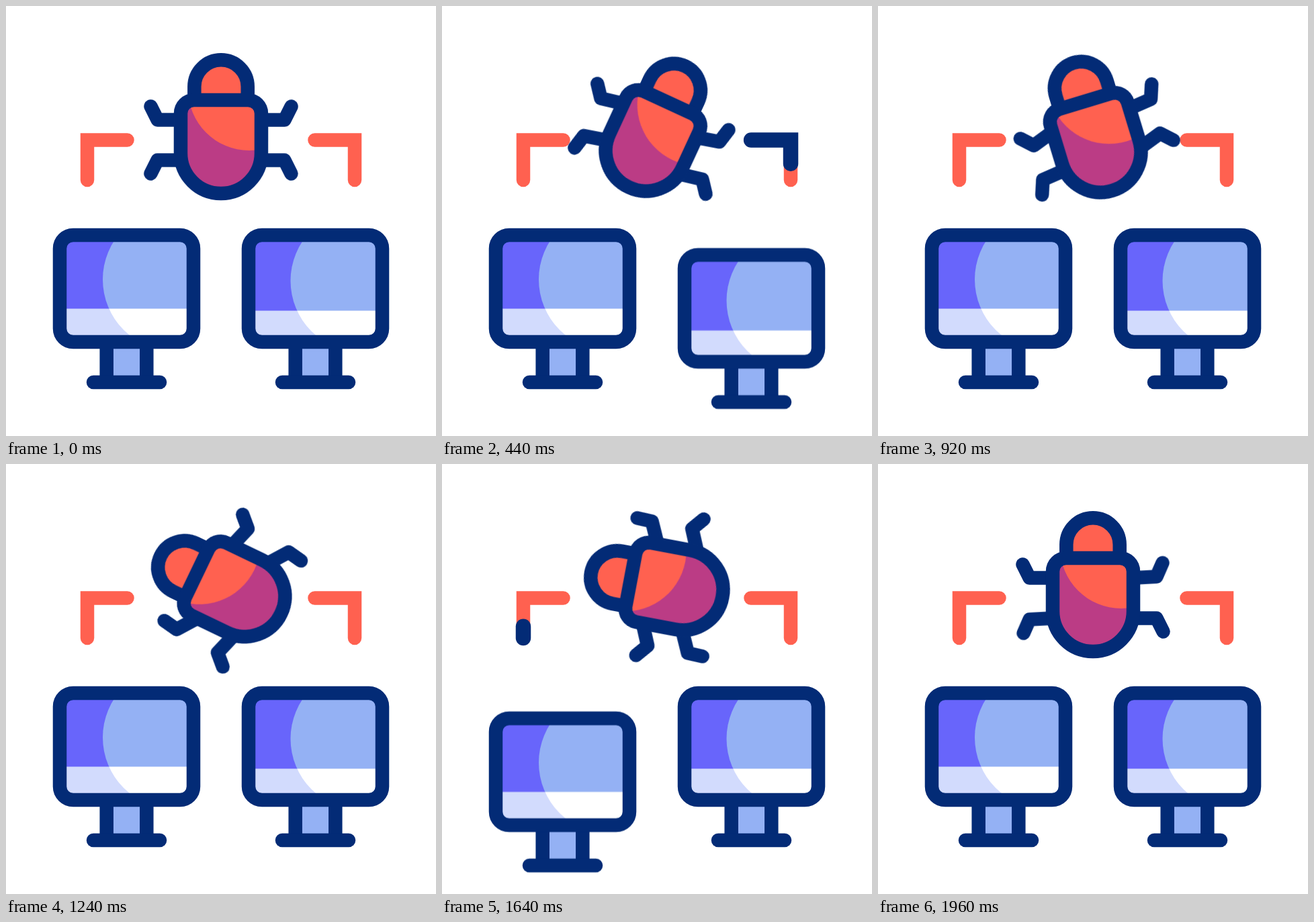
An HTML page that plays this animation: 640x640 px, repeating every 2000 ms.

```html
<!DOCTYPE html>
<html lang="en">
<head>
<meta charset="utf-8">
<title>Bug between two computers</title>
<style>
  :root { --navy: #032b76; --coral: #ff6150; --plum: #bb3c85; --violet: #6865fb; --sky: #94b1f4; --mist: #d2dbfd; }
  html, body { margin: 0; width: 100%; height: 100%; overflow: hidden; background: #fff; }
  svg { display: block; width: 100vw; height: 100vh; }

  .line { fill: none; stroke: var(--navy); stroke-width: 20.5; stroke-linecap: round; stroke-linejoin: round; }
  .flat { stroke-linecap: butt; }
  .wire { fill: none; stroke: var(--coral); stroke-width: 20.5; stroke-linecap: round; }
  .pulse { stroke: var(--navy); stroke-width: 22.5; }

  .bug, .leg, .pulse, .pc { animation: 2s linear infinite; }
  .bug { transform-origin: 320px 180px; animation-name: turn; }
  .leg, .pc { animation-timing-function: cubic-bezier(.333, 0, .667, 1); }
  .a { animation-name: kick-a; }
  .b { animation-name: kick-b; }
  .fl { transform-origin: 260px 169px; }
  .fr { transform-origin: 380px 169px; }
  .rl { transform-origin: 260px 229px; }
  .rr { transform-origin: 380px 229px; }
  .pc.left { animation-name: drop-left; }
  .pc.right { animation-name: drop-right; }
  .pulse.left { animation-name: run-left, show-left; animation-timing-function: linear, step-end; }
  .pulse.right { animation-name: run-right, show-right; animation-timing-function: linear, step-end; }

  @keyframes turn {
    0% { transform: rotate(0deg); }
    20%, 32% { transform: rotate(24.8deg); }
    74%, 80% { transform: rotate(-99.8deg); }
    90%, 100% { transform: rotate(0deg); }
  }
  @keyframes kick-a {
    0% { transform: rotate(0deg); }
    18% { transform: rotate(-22deg); }
    33% { transform: rotate(36deg); }
    48% { transform: rotate(-22deg); }
    62% { transform: rotate(36deg); }
    79% { transform: rotate(-25deg); }
    98%, 100% { transform: rotate(0deg); }
  }
  @keyframes kick-b {
    0% { transform: rotate(0deg); }
    18% { transform: rotate(-20deg); }
    36% { transform: rotate(27deg); }
    52% { transform: rotate(-22deg); }
    66% { transform: rotate(27deg); }
    83% { transform: rotate(-25deg); }
    98% { transform: rotate(-3deg); }
    100% { transform: rotate(0deg); }
  }
  @keyframes drop-right {
    0%, 10% { transform: translateY(0); }
    22%, 28% { transform: translateY(29.5px); }
    40%, 100% { transform: translateY(0); }
  }
  @keyframes drop-left {
    0%, 74% { transform: translateY(0); }
    86% { transform: translateY(50.3px); }
    98%, 100% { transform: translateY(0); }
  }
  @keyframes run-right {
    0%, 14% { stroke-dasharray: 0 300; stroke-dashoffset: 0; }
    22% { stroke-dasharray: 79 300; stroke-dashoffset: 0; }
    24% { stroke-dasharray: 80 300; stroke-dashoffset: -20; }
    32%, 100% { stroke-dasharray: 0 300; stroke-dashoffset: -100; }
  }
  @keyframes run-left {
    0%, 66% { stroke-dasharray: 0 300; stroke-dashoffset: 0; }
    73.5% { stroke-dasharray: 75 300; stroke-dashoffset: 0; }
    76% { stroke-dasharray: 75 300; stroke-dashoffset: -25; }
    83.5%, 100% { stroke-dasharray: 0 300; stroke-dashoffset: -100; }
  }
  @keyframes show-right {
    0% { opacity: 0; }
    14% { opacity: 1; }
    32%, 100% { opacity: 0; }
  }
  @keyframes show-left {
    0% { opacity: 0; }
    66% { opacity: 1; }
    83.5%, 100% { opacity: 0; }
  }
</style>
</head>
<body>
<svg viewBox="0 0 640 640">
  <defs>
    <path id="shell" d="M260 160a20 20 0 0 1 20-20h80a20 20 0 0 1 20 20v59a60 60 0 0 1-120 0z"/>
    <clipPath id="in-shell"><use href="#shell"/></clipPath>
    <path id="wire-left" d="M180.5 199.5H121V259" pathLength="100"/>
    <path id="wire-right" d="M459.5 199.5H519V259" pathLength="100"/>
    <rect id="screen" x="80" y="341" width="199" height="159" rx="20"/>
    <clipPath id="in-screen"><use href="#screen"/></clipPath>
    <clipPath id="lens-left"><circle cx="250" cy="407" r="106"/></clipPath>
    <clipPath id="lens-right"><circle cx="248.5" cy="409" r="106"/></clipPath>
    <g id="case">
      <rect x="150" y="505" width="59" height="50" fill="var(--sky)"/>
      <path class="line flat" d="M149.7 505v52M209.3 505v52"/>
      <path class="line" d="M130 560h99"/>
      <use href="#screen" class="line"/>
    </g>
  </defs>

  <g class="pc left">
    <g clip-path="url(#in-screen)">
      <path fill="var(--violet)" d="M80 341h200v110H80z"/>
      <path fill="var(--mist)" d="M80 450.5h200v50H80z"/>
      <g clip-path="url(#lens-left)">
        <path fill="var(--sky)" d="M80 341h200v110H80z"/>
        <path fill="#fff" d="M80 450.5h200v50H80z"/>
      </g>
    </g>
    <use href="#case"/>
  </g>

  <g class="pc right">
    <g transform="translate(281)">
      <g clip-path="url(#in-screen)">
        <path fill="var(--violet)" d="M80 341h200v113H80z"/>
        <path fill="var(--mist)" d="M80 453.5h200v47H80z"/>
        <g clip-path="url(#lens-right)">
          <path fill="var(--sky)" d="M80 341h200v113H80z"/>
          <path fill="#fff" d="M80 453.5h200v47H80z"/>
        </g>
      </g>
      <use href="#case"/>
    </g>
  </g>

  <use href="#wire-left" class="wire"/>
  <use href="#wire-right" class="wire"/>
  <path class="wire pulse left" d="M180.5 199.5H121V259" pathLength="100"/>
  <path class="wire pulse right" d="M459.5 199.5H519V259" pathLength="100"/>

  <g class="bug">
    <path class="line leg a fl" d="M260 169.5H225.5L215.5 149.5"/>
    <path class="line leg b fr" d="M380 169.5H414.5L424.5 149.5"/>
    <path class="line leg b rl" d="M260 229.5H225.5L215.5 249.5"/>
    <path class="line leg a rr" d="M380 229.5H414.5L424.5 249.5"/>
    <path class="line" style="fill: var(--coral)" d="M280.3 140v-20a39.7 39.7 0 0 1 79.4 0v20"/>
    <g clip-path="url(#in-shell)">
      <path fill="var(--plum)" d="M250 130h140v160H250z"/>
      <circle cx="362" cy="124" r="91" fill="var(--coral)"/>
    </g>
    <use href="#shell" class="line"/>
  </g>
</svg>
</body>
</html>
```
